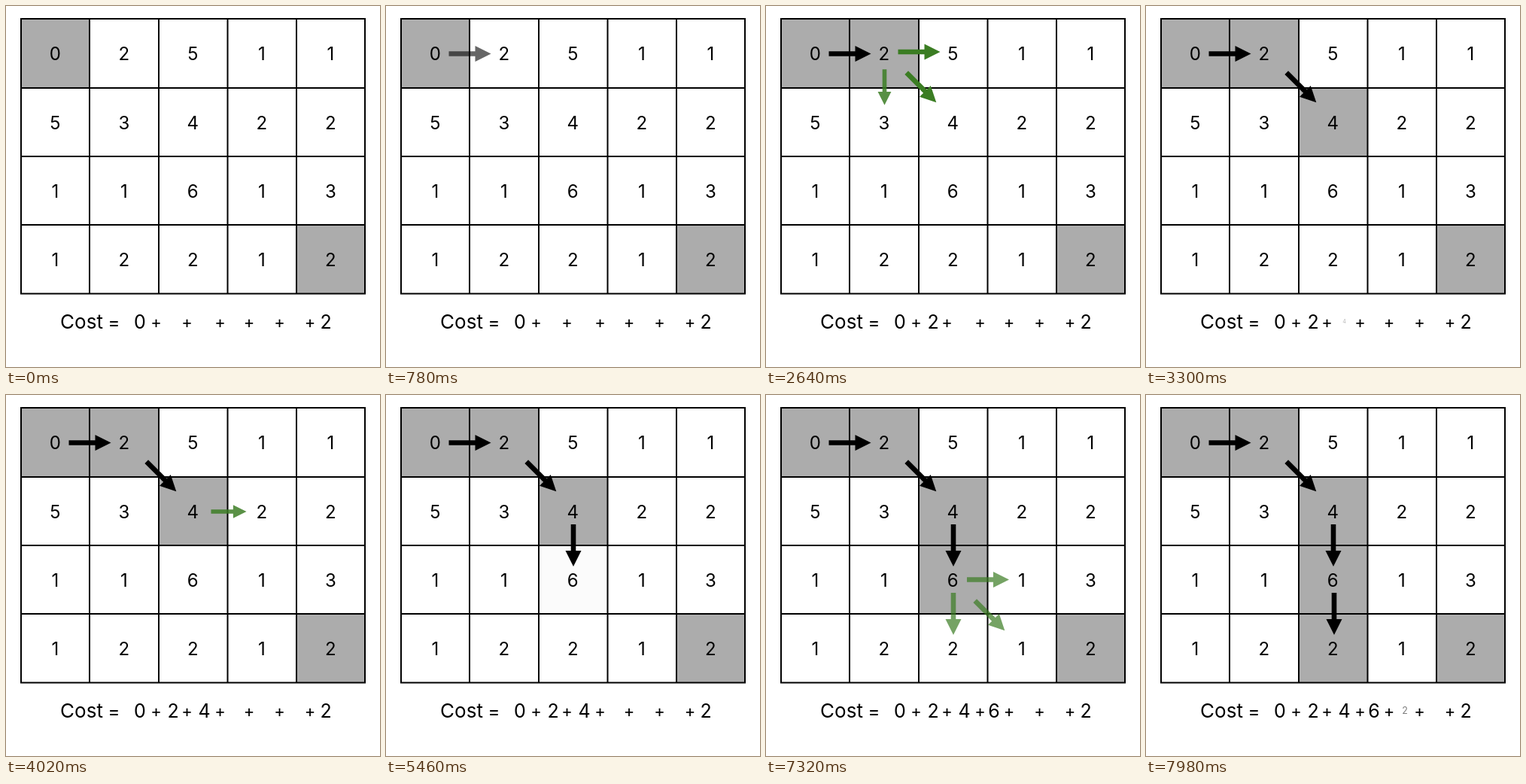
These frames come from a looping animation (497 by 480 pixels, 8000 ms). An HTML page:

```html
<!DOCTYPE html>
<html lang="en">
<head>
<meta charset="utf-8">
<title>Grid path cost</title>
<style>
  html, body { margin: 0; width: 100%; height: 100%; overflow: hidden; background: #fff; }
  svg { display: block; width: 100%; height: 100%; }
  text { font: 24px Inter, "Open Sans", sans-serif; text-anchor: middle; }
  .grid { stroke: #000; stroke-width: 2; fill: none; }
</style>
</head>
<body>
<svg id="stage" viewBox="0 0 497 480"></svg>
<script>
const LOOP = 8000, TICK = 60;
const GRAY = '#acacac', GREEN = '#3b7d23';
const ARROW = 'M-28-3.3H7V-10.5L28 0L7 10.5V3.3H-28Z';
const xs = [20, 111, 203, 294.5, 386, 477];
const ys = [17, 109, 200, 291, 382.5];
const costs = ['02511', '53422', '11613', '12212'];

const stage = document.getElementById('stage');
const parts = [];

function add(tag, attrs, text) {
  const el = document.createElementNS('http://www.w3.org/2000/svg', tag);
  for (const key in attrs) el.setAttribute(key, attrs[key]);
  if (text) el.textContent = text;
  return stage.appendChild(el);
}

const label = (x, y, text, size = 24) =>
  add('text', { x, y, style: `font-size:${size}px` }, text);

const cell = (col, row) => add('rect', {
  x: xs[col], y: ys[row], fill: GRAY,
  width: xs[col + 1] - xs[col], height: ys[row + 1] - ys[row]
});

const ramp = (t, start, length) => Math.min(1, Math.max(0, (t - start) / length));

const fade = (el, start, length) => parts.push(t =>
  el.setAttribute('opacity', ramp(t, start, length)));

// Grows from its centre while fading in; optionally fades out later.
function zoom(el, [x, y, angle = 0], start, out = Infinity) {
  parts.push(t => {
    const p = ramp(t, start, 300);
    el.setAttribute('transform', `translate(${x} ${y}) rotate(${angle}) scale(${p})`);
    el.setAttribute('opacity', p * (1 - ramp(t, out, 200)));
  });
}

// Poses are [centre x, centre y, angle]; times are in ms.
const steps = [
  { cell: [1, 0], value: ['2', 222], arrows: [[111.5, 63.5, 0], [115, 108, 45], [65, 110, 90]],
    starts: [10, 110, 200], out: 500, fill: 840, black: [111.5, 63.5, 0], text: 1050 },
  { cell: [2, 1], value: ['4', 263.5], arrows: [[203.5, 61, 0], [206.5, 108.5, 45], [157.5, 108, 90]],
    starts: [1622, 2004, 2385], out: 2690, fill: 3010, black: [206.5, 108.5, 45], text: 3215 },
  { cell: [2, 2], value: ['6', 303], arrows: [[296, 155, 0], [297.5, 200.5, 45], [249, 200, 90]],
    starts: [3768, 4230, 4700], out: 5110, fill: 5450, black: [249, 200, 90], text: 5680 },
  { cell: [2, 3], value: ['2', 344], arrows: [[295, 245.5, 0], [297.5, 293.5, 45], [249, 291, 90]],
    starts: [6228, 6590, 6950], out: 7260, fill: 7600, black: [250, 291, 90], text: 7830 }
];

cell(0, 0);
cell(4, 3);
for (const s of steps) fade(cell(...s.cell), s.fill, 220);

add('path', {
  class: 'grid', 'stroke-linecap': 'square',
  d: xs.map(x => `M${x} ${ys[0]}V${ys[4]}`).join('') + ys.map(y => `M${xs[0]} ${y}H${xs[5]}`).join('')
});

costs.forEach((row, r) => [...row].forEach((digit, c) =>
  label(65.3 + 91.5 * c, 72.2 + 91.3 * r, digit)));

label(100.5, 428.5, 'Cost', 26);
label(143.5, 428.5, '=');
label(178, 428.5, '0', 25);
for (const x of [199.5, 240.5, 284.5, 323, 363.5, 404]) label(x, 427.8, '+', 22);
label(425, 428.5, '2', 25);

for (const s of steps) {
  s.arrows.forEach((pose, i) =>
    zoom(add('path', { d: ARROW, fill: GREEN }), pose, s.starts[i], s.out));
  const [x, y, angle] = s.black;
  fade(add('path', { d: ARROW, transform: `translate(${x} ${y}) rotate(${angle})` }), s.out + 190, 150);
  const [digit, cx] = s.value;
  zoom(label(0, 9, digit, 25), [cx, 419.5], s.text);
}

function draw() {
  const t = performance.now() % LOOP;
  const now = t - t % TICK;
  for (const update of parts) update(now);
  requestAnimationFrame(draw);
}
draw();
</script>
</body>
</html>
```
